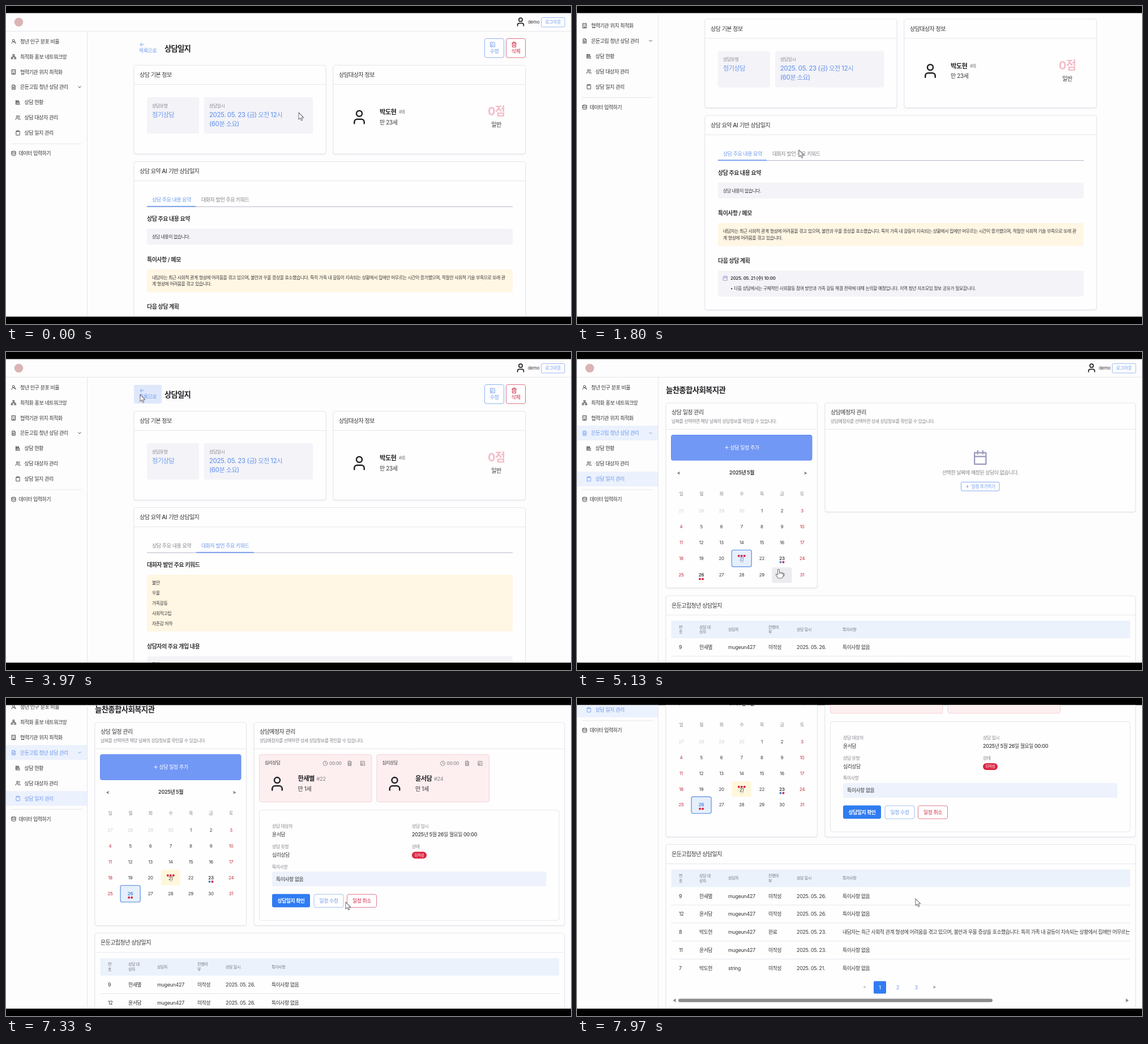
An HTML page with a canvas for the animation above (8000 ms loop, 998 px wide and 561 px high).

```html
<!DOCTYPE html>
<html lang="ko">
<head>
<meta charset="utf-8">
<title>상담 관리</title>
<style>
html, body { margin: 0; width: 100%; height: 100%; overflow: hidden; background: #000; }
canvas { display: block; width: 100%; height: 100%; }
</style>
</head>
<body>
<canvas id="stage" width="998" height="561"></canvas>
<script>
const ctx = document.getElementById('stage').getContext('2d');
const LOOP = 8000, TOP = 12.5, BOTTOM = 548;
const FAMILY = 'Inter, "Noto Sans CJK KR", "Noto Sans CJK", sans-serif';

const INK = '#37373b', DARK = '#222226', MUTED = '#85858d', BLUE = '#6f9aee', STRONG = '#307cf1',
  RED = '#cf2946', LINE = '#e5e6ee', PALE = '#f3f3f8', TINT = '#ebf1fd', CREAM = '#fff6e3';

const ADULT = '박도현', LEFT = '한새별', RIGHT = '윤서담';
const STAFF = 'mugeun427', CENTER = '늘찬종합사회복지관';
const MEMO = '내담자는 최근 사회적 관계 형성에 어려움을 겪고 있으며, 불안과 우울 증상을 호소했습니다. ' +
  '특히 가족 내 갈등이 지속되는 상황에서 집에만 머무르는 시간이 증가했으며, 적절한 사회적 기술 부족으로 또래 관';

// Icons on a 24-unit grid
const ICON = {
  user: 'M16 7a4 4 0 1 1-8 0a4 4 0 1 1 8 0M19 21v-2a4 4 0 0 0-4-4H9a4 4 0 0 0-4 4v2',
  users: 'M13 7a4 4 0 1 1-8 0a4 4 0 1 1 8 0M16 21v-2a4 4 0 0 0-4-4H6a4 4 0 0 0-4 4v2M16 3a4 4 0 0 1 0 8M22 21v-2a4 4 0 0 0-3-4',
  round: 'M16 8a5 5 0 1 1-10 0a5 5 0 1 1 10 0M3 21a8 8 0 0 1 12-7M14 14l7 7M19 13v6',
  net: 'M9 2h6v6H9zM2 16h6v6H2zM16 16h6v6h-6zM12 8v4M5 16v-4h14v4',
  building: 'M4 2h16v20H4zM9 22v-4h6v4M8 6h1M15 6h1M8 10h1M15 10h1M8 14h1M15 14h1',
  doc: 'M14 2H5v20h14V7zM14 2v5h5M8 13h8M8 17h8M8 9h2',
  chart: 'M3 3v18h18M7 4h9v4H7zM7 11h12v5H7z',
  clip: 'M8 4H4v18h16V4h-4M8 2h8v4H8z',
  data: 'M3 5a9 3 0 1 0 18 0a9 3 0 1 0-18 0M3 5v14a9 3 0 0 0 18 0V5M3 12a9 3 0 0 0 18 0',
  down: 'M6 9l6 6l6-6',
  back: 'M12 19l-7-7l7-7M5 12h15',
  edit: 'M12 3H3v18h18v-9M18 2l4 4l-10 10l-5 1l1-5z',
  trash: 'M3 6h18M5 6v16h14V6M8 6V2h8v4M10 11v6M14 11v6',
  cal: 'M3 4h18v18H3zM3 10h18M8 1v5M16 1v5',
  clock: 'M22 12a10 10 0 1 1-20 0a10 10 0 1 1 20 0M12 6v6l4 2',
  plus: 'M12 4v16M4 12h16'
};
for (const k in ICON) ICON[k] = new Path2D(ICON[k]);

// Time, value(s): eased between neighbours
const CURSOR = [[0, 517, 188], [900, 517, 188], [1600, 392, 254], [2350, 392, 254], [2900, 352, 230],
  [3700, 237, 75], [4550, 237, 75], [5130, 356, 383], [5450, 221, 394], [5650, 221, 394],
  [6150, 698, 218], [6700, 698, 218], [7150, 600, 360], [7530, 600, 360], [8000, 598, 354]];
const SCROLL = [[0, 0], [200, 0], [800, 81.5], [2550, 81.5], [3200, 0], [8000, 0]];
const TAB_AT = 1950, LIST_AT = 4400, DAY_AT = 5530, DETAIL_AT = 6200;

function track(keys, t) {
  const i = Math.max(1, keys.findIndex(k => k[0] >= t));
  const a = keys[i - 1], b = keys[i], u = (t - a[0]) / (b[0] - a[0]);
  const e = u * u * (3 - 2 * u);
  return a.slice(1).map((v, j) => v + (b[j + 1] - v) * e);
}

function scrollAt(t) {
  if (t < 7150) return track(SCROLL, t)[0];
  return t < 7530 ? 98 * (t - 7150) / 380 : Math.min(203, 98 + 105 * (t - 7530) / 440);
}

function text(str, x, y, size, color = INK, weight = 400, align = 0) {
  ctx.font = `${weight} ${size}px ${FAMILY}`;
  ctx.fillStyle = color;
  const runs = str.match(/[가-힣]+|[^가-힣]+/g).map(s => {
    const gap = (s[0] >= '가' ? -0.055 : -0.03) * size + 'px';
    ctx.letterSpacing = gap;
    return { s, gap, w: ctx.measureText(s).width };
  });
  x -= align * runs.reduce((sum, r) => sum + r.w, 0);
  for (const r of runs) {
    ctx.letterSpacing = r.gap;
    ctx.fillText(r.s, x, y + size * 0.365);
    x += r.w;
  }
}
const mid = (str, x, y, size, color, weight) => text(str, x, y, size, color, weight, 0.5);

function box(x1, y1, x2, y2, fill, stroke, r = 3, lw = 1) {
  ctx.beginPath();
  ctx.roundRect(x1, y1, x2 - x1, y2 - y1, r);
  if (fill) { ctx.fillStyle = fill; ctx.fill(); }
  if (stroke) { ctx.strokeStyle = stroke; ctx.lineWidth = lw; ctx.stroke(); }
}

function line(x1, y1, x2, y2, color = LINE, lw = 1) {
  ctx.beginPath();
  ctx.moveTo(x1, y1);
  ctx.lineTo(x2, y2);
  ctx.strokeStyle = color;
  ctx.lineWidth = lw;
  ctx.stroke();
}

function dot(x, y, r, color) {
  ctx.beginPath();
  ctx.arc(x, y, r, 0, 7);
  ctx.fillStyle = color;
  ctx.fill();
}

function icon(name, x, y, size, color = INK, sw = 2) {
  ctx.save();
  ctx.translate(x - size / 2, y - size / 2);
  ctx.scale(size / 24, size / 24);
  ctx.lineCap = ctx.lineJoin = 'round';
  ctx.lineWidth = sw;
  ctx.strokeStyle = color;
  ctx.stroke(ICON[name]);
  ctx.restore();
}

function withShadow(color, blur, dy, draw) {
  ctx.save();
  ctx.shadowColor = color;
  ctx.shadowBlur = blur;
  ctx.shadowOffsetY = dy;
  draw();
  ctx.restore();
}

function panel(x1, y1, x2, y2, title, rule) {
  withShadow('rgba(70,70,110,.16)', 2, 1, () => box(x1, y1, x2, y2, '#fefefe', null, 4));
  box(x1, y1, x2, y2, null, LINE, 4);
  text(title, x1 + 10, y1 + (rule > 40 ? 16 : 17), 10, INK, 500);
  line(x1, y1 + rule, x2, y1 + rule);
}

function frame(active) {
  dot(22.5, 28.5, 7.8, '#dcb4b4');
  icon('user', 909, 28, 18.5, DARK, 2.2);
  text('demo', 922, 28.5, 7.9);
  box(945.5, 20.5, 987, 37, '#fefefe', '#9dbaf3', 2);
  mid('로그아웃', 966, 28.5, 8, BLUE);
  line(0, 44.5, 998, 44.5);
  line(143.5, 44.5, 143.5, 900);
  if (active) {
    box(0, 130, 143, 156, TINT, null, 0);
    box(0, 211, 143, 237, TINT, null, 0);
  }
  const items = [['round', '청년 인구 분포 비율'], ['net', '최적화 홍보 네트워크망'], ['building', '협력기관 위치 최적화'],
    ['doc', '은둔고립 청년 상담 관리'], ['chart', '상담 현황'], ['users', '상담 대상자 관리'], ['clip', '상담 일지 관리']];
  items.forEach(([name, label], i) => {
    const y = 62.5 + 26.9 * i, dx = i > 3 ? 7.5 : 0;
    const color = active && (i === 3 || i === 6) ? BLUE : INK;
    icon(name, 13.5 + dx, y, 9.5, color, 2.2);
    text(label, 25 + dx, y, 9, color);
  });
  icon('down', 130, 143, 9, active ? BLUE : INK, 2.5);
  line(9, 243, 134, 243);
  icon('data', 13.5, 260, 9.5, INK, 2.2);
  text('데이터 입력하기', 22.5, 260, 9, INK, 500);
}

function section(title, y) { text(title, 249, y, 10, INK, 600); }
function small(str, x, y, color = INK, weight = 400) { text(str, x, y, 7.86, color, weight); }
function listBox(y1, items, fill) {
  box(249, y1, 895, y1 + 28 + 18 * (items.length - 1), fill);
  items.forEach((s, i) => small(s, 258, y1 + 14.5 + 18 * i));
}

function journal(tab, mouse) {
  frame(false);
  const [mx, my] = mouse;
  if (mx > 226 && mx < 275 && my > 58 && my < 91) box(226, 58, 275, 91, '#dfe8fb');
  icon('back', 240, 68, 10, BLUE, 2.2);
  text('목록으로', 235, 79, 9, BLUE);
  text('상담일지', 280, 75, 13.3, DARK, 700);
  [[845.5, 'edit', '수정', BLUE, '#8fb0f3'], [883.5, 'trash', '삭제', RED, '#de7186']].forEach(([x, name, label, color, edge]) => {
    box(x, 57.5, x + 34, 91, '#fefefe', edge);
    icon(name, x + 14, 68, 10.5, color, 2.2);
    mid(label, x + 17, 79.5, 9, color, 500);
  });

  panel(226, 104.5, 565, 261, '상담 기본 정보', 34);
  box(249, 161, 341, 225, PALE);
  box(350, 161, 542, 225, PALE);
  small('상담유형', 258, 176, MUTED);
  small('상담일시', 359, 176, MUTED);
  text('정기상담', 258, 191.5, 11.3, BLUE, 500);
  text('2025. 05. 23 (금) 오전 12시', 359, 191.5, 11.2, BLUE, 500);
  text('(60분 소요)', 359, 207.5, 11.2, BLUE, 500);

  panel(578, 104.5, 917.5, 261, '상담대상자 정보', 34);
  icon('user', 624, 196, 30, DARK);
  text(ADULT, 660, 187, 11.3, DARK, 700);
  text('#8', 694, 187, 9.3, MUTED);
  text('만 23세', 660, 205, 10);
  mid('0점', 866, 186, 20, '#f4bcc8', 700);
  mid('일반', 866, 209.5, 10, INK, 500);

  panel(226, 274.5, 917.5, tab ? 624 : 617.5, '상담 요약 AI 기반 상담일지', 34);
  line(249, 354, 895, 354, '#b3b6c6', 1.2);
  text('상담 주요 내용 요약', 258, 342, 9, tab ? MUTED : BLUE, tab ? 400 : 500);
  text('대화자 발언 주요 키워드', 345, 342, 9, tab ? BLUE : MUTED, tab ? 500 : 400);
  line(tab ? 336 : 249, 353.7, tab ? 438 : 335, 353.7, BLUE, 1.8);
  if (tab) {
    section('대화자 발언 주요 키워드', 375.5);
    listBox(393, ['불안', '우울', '가족갈등', '사회적고립', '자존감 저하'], CREAM);
    section('상담자의 주요 개입 내용', 519);
    listBox(537, ['경청', '공감', '정보 제공'], PALE);
    return;
  }
  section('상담 주요 내용 요약', 375.5);
  listBox(393, ['상담 내용이 없습니다.'], PALE);
  section('특이사항 / 메모', 447);
  box(249, 464.5, 895, 505, CREAM);
  small(MEMO, 258, 478.7);
  small('계 형성에 어려움을 겪고 있습니다.', 258, 490.3);
  section('다음 상담 계획', 530.5);
  box(249, 548.5, 895, 594, PALE);
  icon('cal', 262, 561.7, 9, '#8d88c6', 2);
  small('2025. 05. 21 (수) 10:00', 271, 562, INK, 600);
  small('• 다음 상담에서는 구체적인 사회활동 참여 방안과 가족 갈등 해결 전략에 대해 논의할 예정입니다. ' +
    '지역 청년 자조모임 정보 공유가 필요합니다.', 271, 579.7);
}

const colX = c => 184 + 35.6 * c;

function calendar(picked, mouse) {
  text('<', 177, 212.5, 8.5, INK, 600);
  mid('2025년 5월', 291, 212.5, 8.9, INK, 600);
  text('>', 400.5, 212.5, 8.5, INK, 600);
  [...'일월화수목금토'].forEach((d, c) => mid(d, colX(c), 250, 7.86, MUTED));
  for (let i = 0; i < 35; i++) {
    const c = i % 7, row = i / 7 | 0, day = i < 4 ? 27 + i : i - 3, now = i > 3;
    const x = colX(c), y = 280 + 27.9 * row + (row === 4 && picked === 21 ? 1.8 : 0);
    const chosen = now && day === picked;
    const over = Math.abs(mouse[0] - x) < 17.5 && Math.abs(mouse[1] + 3 - y) < 14;
    if (chosen) box(x - 17.5, y - 14.3, x + 17.5, y + 15, '#e6effc', '#6c9de6', 3, 1.4);
    else if (now && day === 21) box(x - 17, y - 14, x + 17, y + 13.5, '#fff7dc', null, 2);
    else if (over && now) box(x - 17.5, y - 13.5, x + 17.5, y + 13.8, '#ececf0');
    const color = !now ? '#cfcfd4' : chosen ? '#4a7fd6' : c === 0 || c === 6 ? '#c02a3c' : INK;
    mid(String(day), x, now && day === 21 ? y + 1 : y, 7.9, color, now && (day === 23 || day === 26) ? 600 : 400);
    if (!now) continue;
    if (day === 21) {
      [-5, 0, 5].forEach(d => dot(x + d, y - 4, 2, RED));
      mid('+3', x, y + 5, 5, MUTED);
    }
    if (day === 23 || day === 26) {
      dot(x - 2.5, y + 7, 2, day === 23 ? '#4d82d2' : RED);
      dot(x + 2.5, y + 7, 2, RED);
    }
  }
}

function visitor(x, name, no, over) {
  const body = () => box(x, 146.5, x + 198.5, 230, '#fdeff0', '#f5d0d7');
  if (over) withShadow('rgba(120,40,60,.3)', 5, 2, body); else body();
  small('심리상담', x + 9.5, 161, INK);
  icon('clock', x + 116.5, 162, 9.5, '#77777d');
  text('00:00', x + 123.5, 162, 8.2, '#77777d');
  icon('doc', x + 159.5, 162, 9.5, '#66666c');
  icon('edit', x + 182.5, 162, 9.5, '#66666c');
  icon('user', x + 31.5, 198, 30, DARK);
  text(name, x + 68, 189, 11.3, DARK, 700);
  text(no, x + 101, 189, 9.3, MUTED);
  text('만 1세', x + 68, 206.7, 10);
}

function detail() {
  box(447.5, 244.5, 977, 439, '#fefefe', LINE, 4);
  [['상담 대상자', RIGHT, 470, 273], ['상담 일시', '2025년 5월 26일 월요일 00:00', 717, 273],
    ['상담 유형', '심리상담', 470, 309], ['상태', '', 717, 309], ['특이사항', '', 470, 344.5]].forEach(([k, v, x, y]) => {
    small(k, x, y, MUTED);
    if (v) text(v, x, y + 14.3, 8.9, INK, 500);
  });
  box(717, 318, 743, 330, '#da2442', null, 6);
  mid('미작성', 730, 324, 6.6, '#fff', 500);
  box(470, 353, 954.5, 379, '#edf2fc');
  text('특이사항 없음', 477, 366, 8.9);
  box(470, 392.5, 537, 416, STRONG);
  mid('상담일지 확인', 503.5, 404.3, 8.9, '#fff', 600);
  box(544, 393, 596, 416, '#fefefe', '#a5c0f4');
  mid('일정 수정', 570, 404.3, 8.9, BLUE);
  box(602.5, 393, 654.5, 416, '#fefefe', '#e07a8f');
  mid('일정 취소', 628.5, 404.3, 8.9, RED, 500);
}

function empty() {
  icon('cal', 712.3, 186.5, 27, '#9898bd', 2);
  mid('선택한 날짜에 예정된 상담이 없습니다.', 712.5, 213, 8.95, MUTED);
  box(678.5, 229.5, 746, 245, '#fefefe', '#86abf2', 2);
  icon('plus', 689.5, 237.3, 7.5, BLUE, 2.6);
  text('일정 추가하기', 696.5, 237.3, 7.8, BLUE, 500);
}

const COLS = [180, 216, 267, 338, 388, 469];

function table(top) {
  panel(157, top, 986.5, top + 300, '은둔고립청년 상담일지', 34);
  box(166.5, top + 44, 977, top + 75, '#ecf2fc', null, 0);
  ['번|호', '상담 대|상자', '상담자', '진행여|부', '상담 일시', '특이사항'].forEach((h, i) => {
    const parts = h.split('|');
    parts.forEach((s, j) => text(s, COLS[i], top + 59.3 + (j * 2 - parts.length + 1) * 4.3, 7, '#73737b'));
  });
  const none = '특이사항 없음';
  const rows = [['9', LEFT, STAFF, '미작성', '26', none], ['12', RIGHT, STAFF, '미작성', '26', none],
    ['8', ADULT, STAFF, '완료', '23', MEMO], ['11', RIGHT, STAFF, '미작성', '23', none],
    ['7', ADULT, 'string', '미작성', '21', none]];
  ctx.save();
  ctx.beginPath();
  ctx.rect(166, top + 75, 811, 225);
  ctx.clip();
  rows.forEach((row, i) => {
    const y = top + 90.8 + 31.8 * i;
    row.forEach((s, c) => text(c === 4 ? `2025. 05. ${s}.` : s, COLS[c], y, 8.9));
    if (i < 4) line(166, y + 15.9, 977, y + 15.9);
  });
  ctx.restore();
  const py = top + 252;
  mid('<', 508, py, 8, MUTED);
  box(524, py - 11, 546, py + 11, STRONG, null, 2);
  mid('1', 535, py, 8.9, '#fff', 500);
  mid('2', 566.5, py, 8.9, BLUE);
  mid('3', 599, py, 8.9, BLUE);
  mid('>', 631, py, 8, INK);
  const sy = top + 275;
  box(179, sy - 3, 734, sy + 3, '#8b8b8e', null, 3);
  ctx.beginPath();
  for (const [x, d] of [[169.5, 5], [974.5, -5]]) {
    ctx.moveTo(x, sy);
    ctx.lineTo(x + d, sy - 3.5);
    ctx.lineTo(x + d, sy + 3.5);
  }
  ctx.fill();
}

function schedule(t, mouse) {
  const cards = t >= DAY_AT, open = t >= DETAIL_AT, end = open ? 448 : 416;
  frame(true);
  text(CENTER, 157, 67, 13.5, DARK, 600);
  panel(157, 90, 424.5, end, '상담 일정 관리', 46.5);
  small('날짜를 선택하면 해당 날짜의 상담정보를 확인할 수 있습니다.', 167, 122, MUTED);
  box(166.5, 146.5, 415, 191, '#7298f5', '#648df3');
  icon('plus', 264.5, 168.5, 8.5, '#fff', 2.4);
  text('상담 일정 추가', 270.5, 168.5, 9, '#fff', 500);
  calendar(cards ? 26 : 21, mouse);

  panel(438, 90, 986.5, open ? 448 : cards ? 240 : 282, '상담예정자 관리', 46.5);
  small('상담예정자를 선택하면 상세 상담정보를 확인할 수 있습니다.', 448, 122, MUTED);
  if (cards) {
    const inRow = mouse[1] > 146 && mouse[1] < 230;
    [[447.5, LEFT, '#22'], [655, RIGHT, '#24']].forEach(([x, name, no]) =>
      visitor(x, name, no, inRow && mouse[0] > x && mouse[0] < x + 198));
  } else empty();
  if (open) detail();
  table(open ? 461.5 : 430);
}

const ARROW = new Path2D('M0 0V12.2L2.9 9.7L4.8 14L6.8 13.1L4.9 9H8.8Z');
const HAND = new Path2D('M-1.5 1.2Q0-.6 1.4 1.2V6Q3 4.9 4 6.3Q5.5 5.4 6.4 6.9Q8.2 6.4 8.3 8.3V11Q8 14 6 16H-.6Q-3 13-4.6 10.5Q-5 8.6-3.2 8.8L-1.5 10.3ZM1.4 6V9M4 6.5V9M6.4 7V9');

function pointer([x, y], hand) {
  ctx.save();
  ctx.translate(x, y);
  ctx.lineJoin = 'round';
  ctx.lineWidth = 1.1;
  ctx.fillStyle = '#fff';
  ctx.strokeStyle = '#77777f';
  const shape = hand ? HAND : ARROW;
  ctx.fill(shape);
  ctx.stroke(shape);
  ctx.restore();
}

function draw(now) {
  const t = now % LOOP, mouse = track(CURSOR, t), scroll = scrollAt(t);
  const local = [mouse[0], mouse[1] + scroll];
  ctx.fillStyle = '#000';
  ctx.fillRect(0, 0, 998, 561);
  ctx.save();
  ctx.beginPath();
  ctx.rect(0, TOP, 998, BOTTOM - TOP);
  ctx.clip();
  ctx.fillStyle = '#fdfdfd';
  ctx.fillRect(0, 0, 998, 561);
  ctx.translate(0, -scroll);
  if (t < LIST_AT) journal(t >= TAB_AT, local); else schedule(t, local);
  ctx.translate(0, scroll);
  const [x, y] = local;
  const onDay = x > 166 && x < 415 && y > 263 && y < 407;
  const onCard = t >= DAY_AT && x > 447 && x < 854 && y > 146 && y < 230;
  pointer(mouse, t >= LIST_AT && (onDay || onCard));
  ctx.restore();
  requestAnimationFrame(draw);
}
requestAnimationFrame(draw);
</script>
</body>
</html>
```
